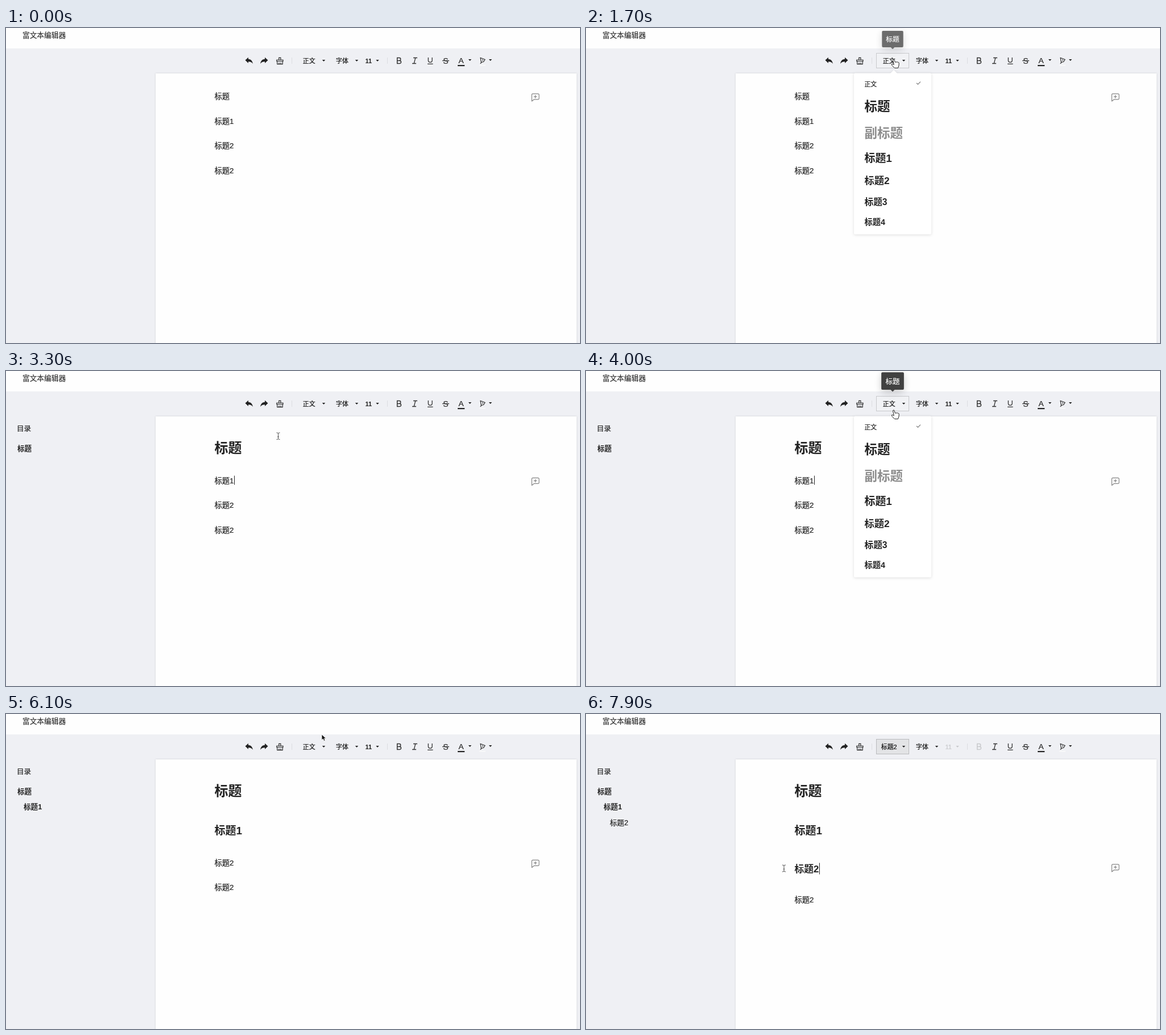
Recreate the animation shown at these times as an HTML page. Size 1009 px wide and 555 px high, loop 8000 ms.

```html
<!DOCTYPE html>
<html lang="zh-CN">
<head>
<meta charset="utf-8">
<title>富文本编辑器</title>
<style>
  html, body { margin: 0; width: 100%; height: 100%; overflow: hidden; background: #eff0f4; }
  svg { display: block; width: 100%; height: 100%; }
  text { font-family: "Liberation Sans", "Noto Sans CJK SC", "Noto Sans CJK", sans-serif; }
  .line { fill: none; stroke: #333; stroke-width: 1.3; }
  .thin { fill: none; stroke: #222; stroke-width: 1.1; }
  .page { filter: drop-shadow(0 0 1.5px #0002); }
  .menu { filter: drop-shadow(0 1px 2.5px #0002); }
  .tip { filter: drop-shadow(0 4px 7px #0003); }
</style>
</head>
<body>
<svg viewBox="0 0 1009 555" preserveAspectRatio="none">
  <rect width="1009" height="555" fill="#eff0f4"/>
  <rect width="1009" height="36" fill="#fefefe"/>
  <rect class="page" x="263" y="80" width="740" height="490" fill="#fefefe"/>
  <g id="scene"></g>
</svg>
<script>
const LOOP = 8000, STEP = 100;
const LINES = ['标题', '标题1', '标题2', '标题2'], HEAD_SIZE = [24, 19, 16.8];
const BODY_SIZE = 13.3, BODY_HEIGHT = 43.5;

// One round per heading: click a line, hover the style button, pick a style, move away
const ROUNDS = [
  { click: 700, hover: 1500, pick: 2500, buttonY: 55, item: [513, 132], rest: [445, 170] },
  { click: 3100, hover: 3700, pick: 4900, buttonY: 69, item: [520, 228], rest: [500, 249] },
  { click: 5700, hover: 6300, pick: 7600, buttonY: 57, item: [534, 276], rest: [348, 272] }
];
const count = (event, t) => ROUNDS.filter(r => r[event] <= t).length;
const during = (t, from, to) => ROUNDS.find(r => t >= r.hover + from && t < r.pick + to);

// y is the middle of the line of text
const text = (s, x, y, size, { fill = '#222', weight = 400, anchor = 'start' } = {}) =>
  `<text x="${x}" y="${y + size * .38}" font-size="${size}" font-weight="${weight}" text-anchor="${anchor}"
    fill="${fill}" stroke="${fill}" stroke-width="${weight < 700 ? .22 : 0}">${s}</text>`;
const path = (d, attrs = 'class="line"') => `<path d="${d}" ${attrs}/>`;
const arrow = (x, y = 57.5, fill = '#222') => path(`M${x - 2.7} ${y - 1.5}h5.4l-2.7 3z`, `fill="${fill}"`);
const at = (x, y, body) => `<g transform="translate(${x} ${y})">${body}</g>`;

// Lines stacked from the top of the page, the first n of them as headings
function layout(n) {
  let top = 98.2;
  return LINES.map((s, i) => {
    const head = i < n, height = head ? 72.5 - 3.5 * i : BODY_HEIGHT;
    const size = head ? HEAD_SIZE[i] : BODY_SIZE, y = top + height / 2;
    top += height;
    return { s, head, size, y, end: 367.5 + size * (2 + .556 * (s.length - 2)) };
  });
}

const TRACK = [[200, 440, 548], ...ROUNDS.flatMap(({ click, hover, pick, buttonY, item, rest }, i) => [
  [click, 402, layout(i)[i].y + 1],
  [hover - 600, 402, layout(i)[i].y + 1],
  [hover - 200, 555, 36],
  [hover, 541, buttonY], [hover + 400, 541, buttonY],
  [pick - 200, ...item], [pick, ...item],
  [pick + 200, ...rest], [pick + 400, ...rest]
])];

function pointerAt(t) {
  const i = TRACK.findLastIndex(p => p[0] <= t);
  const [t0, x0, y0] = TRACK[i], [t1, x1, y1] = TRACK[i + 1] || [LOOP, x0, y0];
  const u = (t - t0) / (t1 - t0), e = u * u * (3 - 2 * u);
  return [x0 + (x1 - x0) * e, y0 + (y1 - y0) * e];
}

function toolbar(label, styled, hover) {
  const off = styled ? '#c8c9cc' : '#222', medium = { fill: '#111', weight: 500 };
  const undo = path('M420.5 56.8 426 51.8V54.8C430.5 55 433 58 434 63 432 60.3 429.5 59.3 426 59.3V62Z', 'fill="#222"');
  const box = styled || hover
    ? `<rect x="510.5" y="44.5" width="57" height="26" fill="${styled ? '#e3e4e6' : '#f1f2f5'}" stroke="${styled ? '#b9babd' : '#c8c9cc'}"/>` : '';
  return undo + `<g transform="translate(881 0) scale(-1 1)">${undo}</g>`
    + path('M479.7 56v-3.6h3.2V56M475.8 56.2h11.2v2.6H475.8zM476.8 59v4.6h9.4V59M480 61v2.4M483 61v2.4', 'class="thin"')
    + path('M502.5 52v11M670.5 52v11', 'stroke="#dcdde1"') + box
    + text(label, 532.7, 57.5, 10.9, { ...medium, anchor: 'middle' }) + arrow(558.5)
    + text('字体', 580, 57.5, 10.9, medium) + arrow(616.5)
    + text('11', 631.5, 57.5, 11, { fill: off, weight: styled ? 400 : 700 }) + arrow(653, 57.5, off)
    + path('M687.7 52.6h3.6a2.4 2.4 0 0 1 0 4.8h-3.6zM687.7 57.4h4.2a2.6 2.6 0 0 1 0 5.2h-4.2z',
      `fill="none" stroke="${styled ? off : '#333'}" stroke-width="1.5"`)
    + path('M716 52.5h7M714 62.5h7M719.8 52.5 717.2 62.5')
    + path('M742.3 52v5a3.4 3.4 0 0 0 6.8 0v-5M741 63.3h9.5')
    + text('S', 773, 57.6, 14, { fill: '#333', anchor: 'middle' }) + path('M767 57.6h12')
    + text('A', 800, 57.2, 13.5, { anchor: 'middle' })
    + path('M794 66.2h12.2', 'stroke="#111" stroke-width="2"') + arrow(815.5, 56.5)
    + path('M834 52.5 842 55.5 839.5 59.5 835.3 60.3ZM836 60.3 833.8 62.8M837.2 55.6 838.6 57.4', 'class="thin"')
    + path('M832 65.7h11', 'stroke="#fafafa" stroke-width="1.6"') + arrow(851.5, 56.5);
}

const documentText = lines =>
  lines.map(l => text(l.s, 366.5, l.y, l.size, { weight: l.head ? 700 : 400 })).join('');

// The caret starts a new blink at every click and pick
function caret(t, { end, y, size }) {
  const last = Math.max(...ROUNDS.flatMap(r => [r.click, r.pick]).filter(v => v <= t));
  return (t - last) % 600 <= 300 ? path(`M${end} ${y - size * .6}v${size * 1.2}`, 'stroke="#222"') : '';
}

const commentIcon = ({ head, y }) => at(930.5, y + (head ? -1.5 : 2),
  path('M-4.5-6H4.5Q6.5-6 6.5-4V2Q6.5 4 4.5 4H-2.5L-6.2 7V-4Q-6.2-6-4.5-6ZM-2.8-1H2.8M0-3.8V1.8',
    'fill="none" stroke="#858585" stroke-width="1.2" stroke-linejoin="round"'));

const contents = n => n ? text('目录', 19, 101, 12.5)
  + LINES.slice(0, n).map((s, i) => text(s, 20 + 11 * i, 136 + 27.5 * i, 12.6, { weight: i < 2 ? 700 : 400 })).join('') : '';

function menu() {
  let y = 99.3, last = 10.8;
  const rows = ['标题', '副标题', '标题1', '标题2', '标题3', '标题4'].map((s, i) => {
    const size = i < 2 ? 22.5 : 18.9 * .91 ** (i - 2);
    y += 12.5 + 1.53 * (size + last) / 2;
    last = size;
    return text(s, 489.5, y, size, { weight: 700, fill: i === 1 ? '#8d8d8d' : '#222' });
  });
  return '<g class="menu" fill="#fff"><rect x="471" y="79.5" width="136" height="284" rx="2"/><path d="M535 80l6-6 6 6z"/></g>'
    + text('正文', 489.5, 99, 10.8, { weight: 500 })
    + path('M581 97l2.5 2.2 4.5-4.5', 'fill="none" stroke="#777" stroke-width="1.1"') + rows.join('');
}

function tooltip(age) {
  const left = Math.max(0, 1 - age / 300), alpha = 1 - left * left, k = .74 + .26 * alpha;
  return `<g opacity="${alpha}" transform="translate(539 48) scale(${k}) translate(-539 -48)">`
    + '<g class="tip" fill="#3c3c3c"><rect x="519" y="2" width="40" height="31" rx="2"/><path d="M535.5 33h7l-3.5 3.5z"/></g>'
    + text('标题', 526.5, 18, 12.6, { fill: '#fff' }) + '</g>';
}

function pointer(t) {
  const [x, y] = pointerAt(t);
  if (during(t, 0, STEP))
    return at(x, y, path('M-1.5 1Q-1-.7.5 0L2.5 5.5Q4 4.2 5 5.2 6.5 4.2 7.3 5.4 9 5 9.2 6.8L9 11 7.5 15.5H1.5L-3.5 10.5Q-4.5 8-2 8.4L.3 9.7Z',
      'fill="#fff" stroke="#222" stroke-linejoin="round"'));
  if (x > 263 && y > 80)
    return at(x, y, path('M-3-6Q0-6 0-4.5 0-6 3-6M0-5V5M-3 6Q0 6 0 4.5 0 6 3 6M-1.5 1.2H1.5', 'fill="none" stroke="#555"'));
  return at(x, y, path('M0 0V10L2.4 7.8 4 11.4 6 10.5 4.4 7.1H7.5Z', 'fill="#111" stroke="#fff" stroke-width=".8"'));
}

function editor(t) {
  const n = count('pick', t), active = Math.max(0, count('click', t) - 1);
  return { n, active, lines: layout(n), styled: active < n };
}

function draw(t) {
  const { n, active, lines, styled } = editor(t), late = editor(t - 200);
  const tip = during(t, -50, 200);
  const overButton = ROUNDS.some(r => t >= r.hover && t <= r.hover + 400);
  return text('富文本编辑器', 29, 12.5, 12.7, { fill: '#333' })
    + toolbar(styled ? LINES[active] : '正文', styled, overButton)
    + contents(count('pick', t - 300))
    + documentText(lines)
    + (count('click', t) ? caret(t, lines[active]) : '')
    + commentIcon(late.lines[late.active])
    + (during(t, 100, 0) ? menu() : '')
    + (tip ? tooltip(t - tip.hover - 50) : '')
    + (t >= TRACK[0][0] ? pointer(t) : '');
}

const scene = document.getElementById('scene'), start = performance.now();
let shown = -1;
function tick() {
  const t = Math.floor((performance.now() - start) % LOOP / STEP) * STEP;
  if (t !== shown) scene.innerHTML = draw(shown = t);
  requestAnimationFrame(tick);
}
tick();
</script>
</body>
</html>
```
